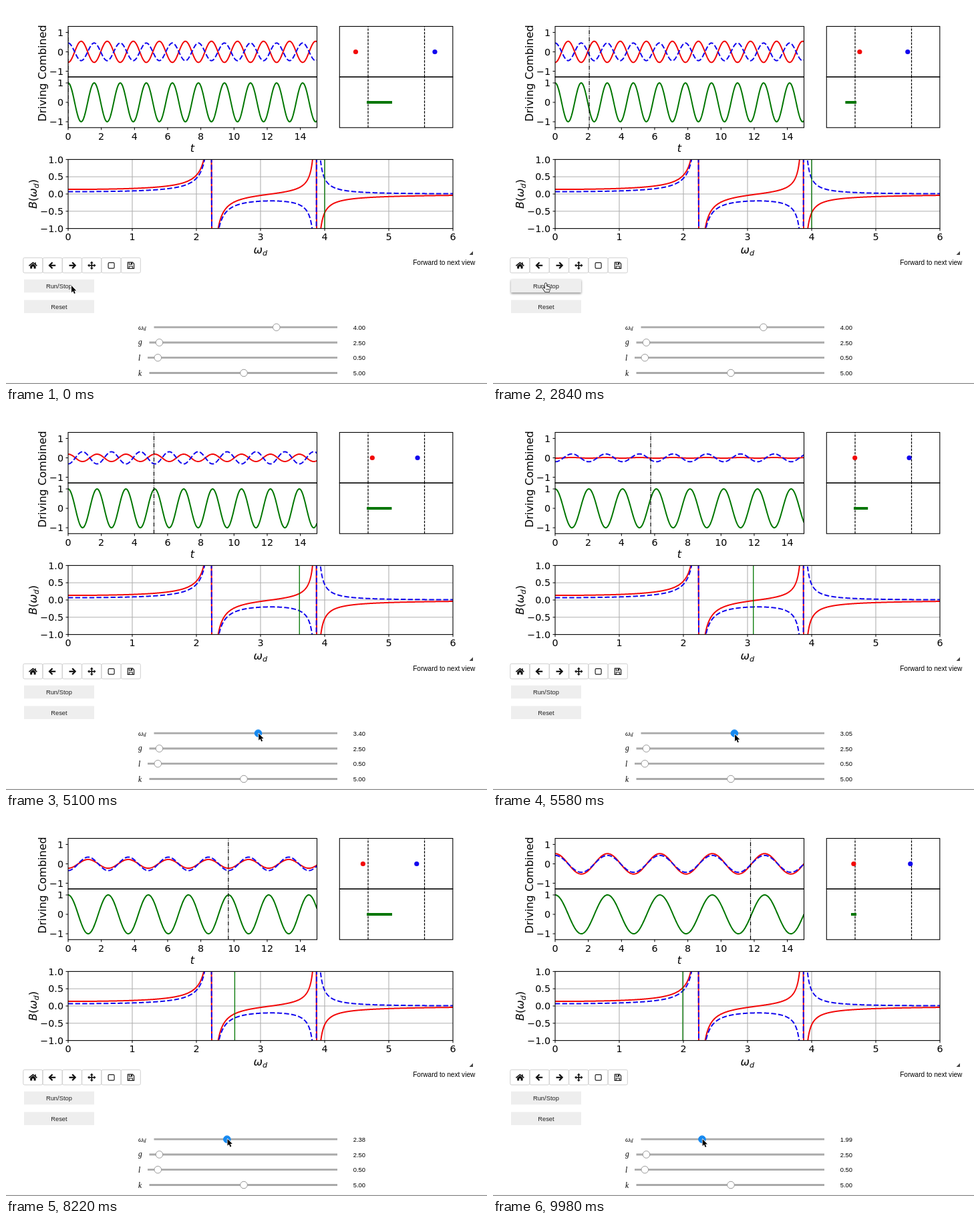
These frames come from a looping animation (720x565 px, 10000 ms). An HTML page with a canvas:

```html
<!DOCTYPE html>
<html lang="en">
<head>
<meta charset="utf-8">
<title>Driven coupled pendula</title>
<style>
  html, body { margin: 0; width: 100%; height: 100%; overflow: hidden; background: #fff; }
  canvas { display: block; }
</style>
</head>
<body>
<canvas id="stage" width="720" height="565"></canvas>
<script>
const ctx = document.getElementById('stage').getContext('2d');
const LOOP = 10000, PLOT_LAG = 160;
const RED = '#f20808', BLUE = '#1206ee', GREEN = '#007600', BLACK = '#000';
const SANS = '"DejaVu Sans", sans-serif';
const UI = '"Liberation Sans", Arial, sans-serif';
const SERIF = '"Liberation Serif", Times, serif';
const DASH = [7.4, 3.2], THIN_DASH = [3.7, 1.6], DASH_DOT = [6.4, 1.6, 1, 1.6];

// Keyframes are [ms, value].
const simKeys = [[1440, 0], [2840, 2.057], [4280, 4.17], [5580, 5.76], [7100, 8.27], [8900, 10.5], [9980, 11.78]];
const omegaKeys = [[4450, 4], [5560, 3.05], [7500, 3.05], [8900, 1.77], [9150, 1.77], [9750, 1.99]];
const pointerX = [[0, 98], [550, 79], [3150, 79], [4050, 405.5]];
const pointerY = [[0, 418], [550, 415], [3150, 415], [4050, 478], [4500, 478], [5500, 482], [7500, 482], [8800, 478], [9150, 478], [9750, 480]];

const linear = u => u;
const smooth = u => u * u * (3 - 2 * u);

function at(keys, ms, ease = smooth) {
  if (ms <= keys[0][0]) return keys[0][1];
  for (let i = 1; i < keys.length; i++) {
    const [t0, a] = keys[i - 1], [t1, b] = keys[i];
    if (ms <= t1) return a + (b - a) * ease((ms - t0) / (t1 - t0));
  }
  return keys[keys.length - 1][1];
}

// Steady amplitudes from the two normal modes (g/l = 5, g/l + 2k = 15).
const mode = (w, square) => 1 / (square - w * w);
const ampA = w => (mode(w, 5) + mode(w, 15)) / 2;
const ampB = w => (mode(w, 5) - mode(w, 15)) / 2;

function text(str, x, y, font, align = 'left', color = BLACK) {
  ctx.font = font;
  ctx.textAlign = align;
  ctx.fillStyle = color;
  ctx.fillText(str, x, y);
  return ctx.measureText(str).width;
}

function stroke(points, color, width, dash = []) {
  ctx.beginPath();
  points.forEach(([x, y]) => ctx.lineTo(x, y));
  ctx.strokeStyle = color;
  ctx.lineWidth = width;
  ctx.setLineDash(dash);
  ctx.stroke();
  ctx.setLineDash([]);
}

function fill(points, color = BLACK) {
  ctx.beginPath();
  points.forEach(([x, y]) => ctx.lineTo(x, y));
  ctx.closePath();
  ctx.fillStyle = color;
  ctx.fill();
}

function disc(x, y, r, color, edge) {
  ctx.beginPath();
  ctx.arc(x, y, r, 0, 7);
  ctx.fillStyle = color;
  ctx.fill();
  if (edge) {
    ctx.strokeStyle = edge;
    ctx.lineWidth = 1;
    ctx.stroke();
  }
}

function box(x, y, w, h) {
  ctx.strokeStyle = BLACK;
  ctx.lineWidth = 1.1;
  ctx.strokeRect(x, y, w, h);
}

function clipped(x, y, w, h, draw) {
  ctx.save();
  ctx.beginPath();
  ctx.rect(x, y, w, h);
  ctx.clip();
  draw();
  ctx.restore();
}

function rotated(x, y, draw) {
  ctx.save();
  ctx.translate(x, y);
  ctx.rotate(-Math.PI / 2);
  draw();
  ctx.restore();
}

function omegaLabel(x, y, size, family) {
  const w = text('ω', x, y, `italic ${size}px ${family}`);
  return w + text('d', x + w, y + size * 0.16, `italic ${size * 0.7}px ${family}`);
}

const tickFont = `14.3px ${SANS}`;

function yTick(label, y) {
  stroke([[89.5, y], [93, y]], BLACK, 1);
  text(label, 86, y + 5.2, tickFont, 'right');
}

function xTick(label, x, y) {
  stroke([[x, y], [x, y + 3.5]], BLACK, 1);
  text(label, x, y + 17.7, tickFont, 'center');
}

function timePlots(w, t) {
  const X = s => 93 + s * 24.83;
  const wave = (amp, y0) => Array.from({ length: 501 }, (_, i) => {
    const s = i * 0.03;
    return [X(s), y0 - 29 * amp * Math.cos(w * s)];
  });
  clipped(93, 30.5, 372.5, 151.5, () => {
    stroke(wave(ampA(w), 68.5), RED, 2);
    stroke(wave(ampB(w), 68.5), BLUE, 2, DASH);
    stroke(wave(1, 144), GREEN, 2);
    stroke([[X(t), 106], [X(t), 30.5]], BLACK, 1.2, DASH_DOT);
    stroke([[X(t), 182], [X(t), 106]], BLACK, 1.2, DASH_DOT);
  });
  box(93, 30.5, 372.5, 75.5);
  box(93, 106, 372.5, 75.8);
  for (const y0 of [68.5, 144]) {
    yTick('1', y0 - 29);
    yTick('0', y0);
    yTick('−1', y0 + 29);
  }
  for (let s = 0; s < 15; s += 2) xTick(s, X(s), 181.8);
  const label = `16px ${SANS}`;
  rotated(60, 69, () => text('Combined', 0, 0, label, 'center'));
  rotated(60, 144, () => text('Driving', 0, 0, label, 'center'));
  text('t', 279, 218, `italic 16px ${SANS}`, 'center');
}

function pendulumView(w, t) {
  const c = Math.cos(w * t), unit = 34;
  for (const x of [542, 626.5]) {
    stroke([[x, 106], [x, 30.5]], BLACK, 1.2, THIN_DASH);
    stroke([[x, 182], [x, 106]], BLACK, 1.2, THIN_DASH);
  }
  disc(542 + unit * ampA(w) * c, 68.5, 3.6, RED);
  disc(626.5 + unit * ampB(w) * c, 68.5, 3.6, BLUE);
  const end = 542 + unit * c;
  ctx.fillStyle = GREEN;
  ctx.fillRect(Math.min(542, end) - 2, 142, Math.abs(end - 542) + 4, 4);
  box(499.3, 30.5, 169.5, 75.5);
  box(499.3, 106, 169.5, 75.8);
}

function resonancePlot(w) {
  const X = v => 93 + v * 96, Y = b => 281 - b * 51.6;
  const curve = amp => Array.from({ length: 1201 }, (_, i) => {
    const v = i * 0.005;
    return [X(v), Y(Math.max(-1.1, Math.min(1.1, amp(v))))];
  });
  for (let v = 1; v < 6; v++) stroke([[X(v), 229.5], [X(v), 332.5]], '#b0b0b0', 1.1);
  for (const b of [-0.5, 0, 0.5]) stroke([[93, Y(b)], [669, Y(b)]], '#b0b0b0', 1.1);
  clipped(93, 229.4, 576, 103.2, () => {
    stroke(curve(ampA), RED, 2);
    stroke(curve(ampB), BLUE, 2, DASH);
    stroke([[X(w), 229], [X(w), 333]], GREEN, 1.3);
  });
  box(93, 229.4, 576, 103.2);
  ['1.0', '0.5', '0.0', '−0.5', '−1.0'].forEach((s, i) => yTick(s, Y(1 - i / 2)));
  for (let v = 0; v <= 6; v++) xTick(v, X(v), 332.6);
  omegaLabel(370.5, 370, 16, SANS);
  rotated(46, 303, () => {
    let x = text('B', 0, 0, `italic 16px ${SANS}`);
    x += text('(', x, 0, `16px ${SANS}`);
    x += omegaLabel(x, 0, 16, SANS);
    text(')', x, 0, `16px ${SANS}`);
  });
}

function arrowIcon(dir) {
  const p = (x, y) => [x * dir, y];
  stroke([p(-4.5, 0), p(5, 0)], '#111', 2.2);
  stroke([p(0.2, -4.5), p(4.6, 0), p(0.2, 4.5)], '#111', 2.3);
}

const icons = [
  () => {
    stroke([[-6, 0.6], [0, -4.4], [6, 0.6]], '#111', 1.5);
    fill([[-4.2, 0.8], [0, -2.8], [4.2, 0.8], [4.2, 4.6], [1.2, 4.6], [1.2, 1.6], [-1.2, 1.6], [-1.2, 4.6], [-4.2, 4.6]], '#111');
    ctx.fillRect(2.8, -4.5, 1.6, 3);
  },
  () => arrowIcon(-1),
  () => arrowIcon(1),
  () => {
    for (let i = 0; i < 4; i++) {
      ctx.rotate(Math.PI / 2);
      stroke([[0, 0], [4, 0]], '#111', 1.7);
      fill([[3.4, -2.5], [6.2, 0], [3.4, 2.5]], '#111');
    }
  },
  () => {
    ctx.beginPath();
    ctx.roundRect(-4.5, -4.2, 9, 8.6, 1.6);
    ctx.strokeStyle = '#222';
    ctx.lineWidth = 1.2;
    ctx.stroke();
  },
  () => {
    stroke([[-4.7, -4.6], [2.6, -4.6], [4.7, -2.5], [4.7, 4.6], [-4.7, 4.6], [-4.7, -5]], '#222', 1.2);
    stroke([[-2.6, 4.6], [-2.6, 1.2], [2.6, 1.2], [2.6, 4.6]], '#222', 1.1);
    stroke([[-2.6, -4.6], [-2.6, -1.5], [1.8, -1.5], [1.8, -4.6]], '#222', 1.1);
    ctx.fillRect(0, -4.2, 1.4, 2.2);
  }
];

function toolbar() {
  icons.forEach((icon, i) => {
    const x = 25.8 + i * 29.3;
    ctx.beginPath();
    ctx.roundRect(x, 376.3, 29, 22.6, 2);
    ctx.strokeStyle = '#cfcfcf';
    ctx.lineWidth = 1;
    ctx.stroke();
    ctx.save();
    ctx.translate(x + 14.6, 387.8);
    icon();
    ctx.restore();
  });
  fill([[699, 366.5], [699, 372], [693.5, 372]], '#444');
  text('Forward to next view', 702.3, 386.6, `10.1px ${UI}`, 'right');
}

function button(label, y, hover) {
  ctx.save();
  if (hover) {
    ctx.shadowColor = 'rgba(0,0,0,.45)';
    ctx.shadowBlur = 3;
    ctx.shadowOffsetY = 1.3;
  }
  ctx.fillStyle = '#eee';
  ctx.fillRect(27, y, 105, 19.6);
  ctx.restore();
  text(label, 79.4, y + 13.5, `9.35px ${UI}`, 'center', '#222');
}

function slider(y, left, x, value, active) {
  stroke([[left, y], [496, y]], '#a9a9a9', 2.8);
  disc(x, y, 5.3, active ? '#1689f0' : '#fff', active ? '#1689f0' : '#999');
  text(value.toFixed(2), 519.7, y + 3.6, `9.35px ${UI}`);
}

function sliders(w, active) {
  const font = `italic 11.5px ${SERIF}`;
  omegaLabel(198, 483.5, 11, SERIF);
  text('g', 198, 506, font);
  text('l', 198, 529.5, font);
  text('k', 198, 552.5, font);
  slider(480.2, 221.5, 222 + w * 45.7, w, active);
  slider(503, 214.5, 229.5, 2.5);
  slider(525.7, 212, 227.3, 0.5);
  slider(548.5, 214.5, 356, 5);
}

function outlined(path, inside, edge) {
  ctx.lineJoin = 'round';
  ctx.strokeStyle = edge;
  ctx.lineWidth = 1.5;
  ctx.stroke(path);
  ctx.fillStyle = inside;
  ctx.fill(path);
  ctx.lineJoin = 'miter';
}

const arrowPath = new Path2D('M0 0V10.2L2.4 8L4 12L5.8 11.2L4.1 7.4H7.3Z');
const handPath = new Path2D('M-1 0Q0 -1.5 1 0V4L5 5Q6.4 5.4 6.2 7L5.2 12H-1L-4 7.5Q-4.5 5.8 -2.6 6.4L-1 8Z');

function pointer(x, y, hand) {
  ctx.save();
  ctx.translate(x, y);
  if (hand) {
    outlined(handPath, '#fff', '#111');
    for (const fx of [1, 2.8, 4.4]) stroke([[fx, 7.5], [fx, 10]], '#111', 0.7);
  } else {
    outlined(arrowPath, '#000', '#fff');
  }
  ctx.restore();
}

function render(ms) {
  const w = at(omegaKeys, ms), plotW = at(omegaKeys, ms - PLOT_LAG);
  const t = at(simKeys, ms, linear);
  const x = at(pointerX, ms) + (w - 4) * 45.7, y = at(pointerY, ms);
  const hover = ms > 120 && x < 132 && y < 428;

  ctx.fillStyle = '#fff';
  ctx.fillRect(0, 0, 720, 565);
  timePlots(plotW, t);
  pendulumView(plotW, t);
  resonancePlot(plotW);
  toolbar();
  button('Run/Stop', 408.7, hover);
  button('Reset', 439.5, false);
  sliders(w, ms > 4050);
  stroke([[0, 564.3], [720, 564.3]], '#888', 1.2);
  pointer(x, y, hover);
}

const start = performance.now();
function tick() {
  render((performance.now() - start) % LOOP);
  requestAnimationFrame(tick);
}
tick();
</script>
</body>
</html>
```
